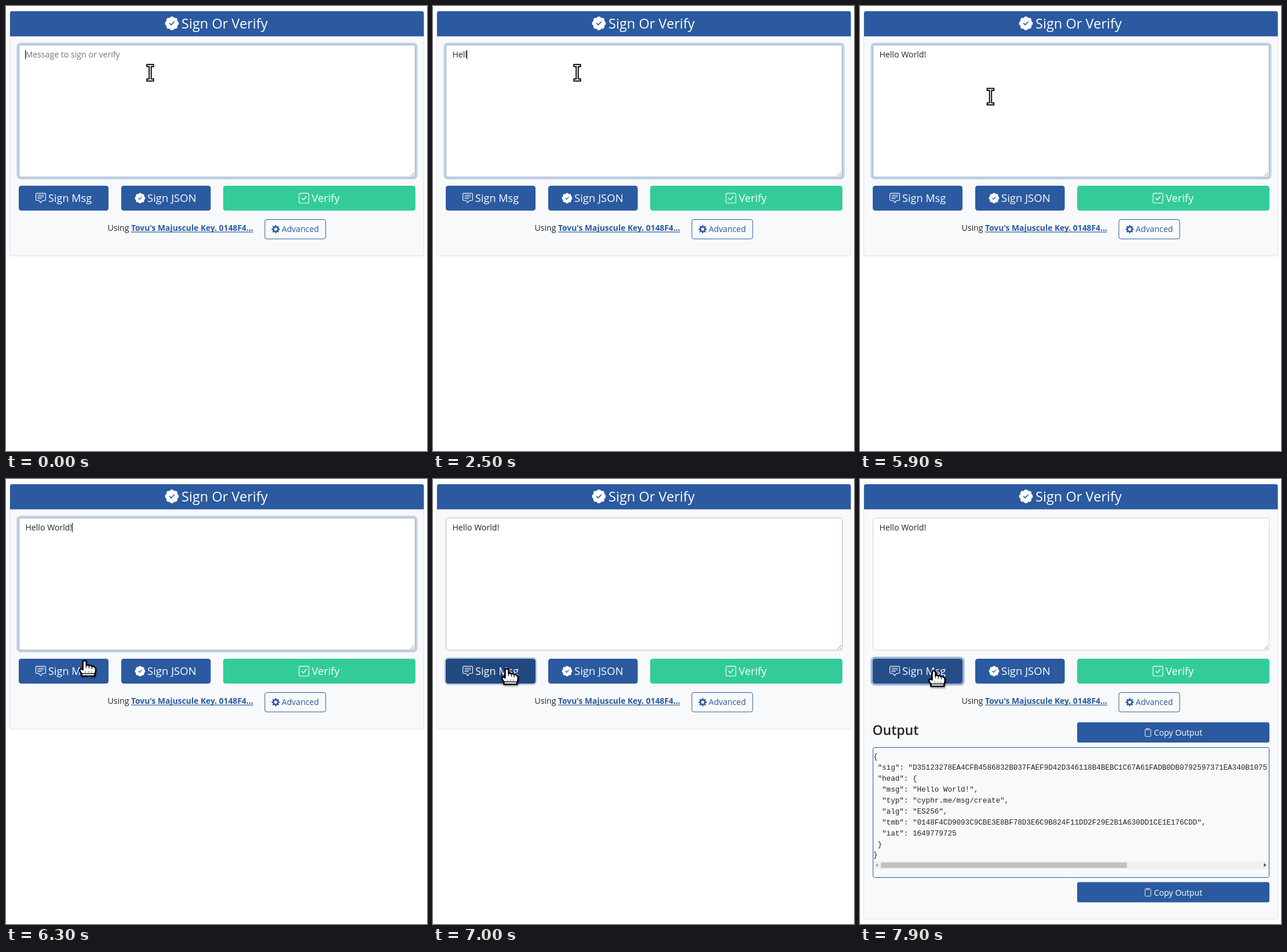
An HTML page with a canvas for the animation above (8 s loop, 727 by 770 pixels).

```html
<!DOCTYPE html>
<html lang="en">
<head>
<meta charset="utf-8">
<title>Sign Or Verify</title>
<style>
  html, body { margin: 0; width: 100%; height: 100%; overflow: hidden; background: #fff; }
  canvas { display: block; width: 727px; height: 770px; }
</style>
</head>
<body>
<canvas id="stage"></canvas>
<script>
const W = 727, H = 770, LOOP = 8000;
const BLUE = '#2b5aa0', GREEN = '#33cc99', INK = '#212529', PANEL = '#f8f9fa';
const SANS = '"Open Sans", sans-serif', MONO = '"Liberation Mono", monospace';
const canvas = document.getElementById('stage');
const ctx = canvas.getContext('2d');
const dpr = window.devicePixelRatio || 1;
canvas.width = W * dpr;
canvas.height = H * dpr;

const MESSAGE = 'Hello World!';
const KEY_TIMES = [1700, 1900, 2300, 2500, 2700, 2900, 3200, 3400, 3600, 4100, 4300, 4900];
const CARET_OFF = [[1100, 1700], [5500, 6100], [6700, 7000]];
const OUTPUT = [
  '{',
  ' "sig": "D35123278EA4CFB4586832B037FAEF9D42D346118B4BEBC1C67A61FADB0DB0792597371EA340B1075',
  ' "head": {',
  '  "msg": "Hello World!",',
  '  "typ": "cyphr.me/msg/create",',
  '  "alg": "ES256",',
  '  "tmb": "0148F4CD9093C9CBE3E8BF78D3E6C9B824F11DD2F29E2B1A630DD1CE1E176CDD",',
  '  "iat": 1649779725',
  ' }',
  '}'
];

const mix = (a, b, p) => 'rgb(' + a.map((v, i) => Math.round(v + (b[i] - v) * p)) + ')';

function box(x, y, w, h, r, fill, stroke) {
  ctx.beginPath();
  ctx.roundRect(x, y, w, h, r);
  if (fill) { ctx.fillStyle = fill; ctx.fill(); }
  if (stroke) { ctx.strokeStyle = stroke; ctx.lineWidth = 1; ctx.stroke(); }
}

function text(str, x, y, size, color, weight = 400, family = SANS) {
  ctx.font = `${weight} ${size}px ${family}`;
  ctx.fillStyle = color;
  ctx.fillText(str, x, y);
  return ctx.measureText(str).width;
}

function line(points, color, width) {
  ctx.beginPath();
  points.forEach(([x, y]) => ctx.lineTo(x, y));
  ctx.strokeStyle = color;
  ctx.lineWidth = width;
  ctx.stroke();
}

// Runs a drawing in units of a 16 x 16 icon grid.
function icon(x, y, size, draw) {
  ctx.save();
  ctx.translate(x, y);
  ctx.scale(size / 16, size / 16);
  ctx.lineCap = ctx.lineJoin = 'round';
  draw();
  ctx.restore();
}

function disc(x, y, r, color) {
  ctx.beginPath();
  ctx.arc(x, y, r, 0, 7);
  ctx.fillStyle = color;
  ctx.fill();
}

function badge() {
  disc(8, 8, 6.4, '#fff');
  for (let i = 0; i < 8; i++) {
    const a = i * Math.PI / 4;
    disc(8 + 5.3 * Math.cos(a), 8 + 5.3 * Math.sin(a), 2.6, '#fff');
  }
  line([[5.5, 8.1], [7.2, 9.8], [10.5, 6.3]], BLUE, 1.1);
}

function chat() {
  ctx.beginPath();
  ctx.moveTo(2, .5);
  ctx.lineTo(14, .5);
  ctx.quadraticCurveTo(15.5, .5, 15.5, 2);
  ctx.lineTo(15.5, 10);
  ctx.quadraticCurveTo(15.5, 11.5, 14, 11.5);
  ctx.lineTo(11.5, 11.5);
  ctx.quadraticCurveTo(10.4, 11.5, 9.8, 12.5);
  ctx.lineTo(8, 15);
  ctx.lineTo(6.2, 12.5);
  ctx.quadraticCurveTo(5.6, 11.5, 4.5, 11.5);
  ctx.lineTo(2, 11.5);
  ctx.quadraticCurveTo(.5, 11.5, .5, 10);
  ctx.lineTo(.5, 2);
  ctx.quadraticCurveTo(.5, .5, 2, .5);
  ctx.strokeStyle = '#fff';
  ctx.lineWidth = 1;
  ctx.stroke();
  [[3.5, 12.5], [6, 12.5], [8.5, 9]].forEach(([y, end], i) =>
    line([[3.5, 3.5 + i * 2.5], [end, y - (i ? 0 : 0)]], '#fff', 1));
}

function checkbox() {
  box(.5, .5, 15, 15, 1.5, null, '#fff');
  line([[4.6, 8], [7.2, 10.6], [11.4, 5.3]], '#fff', 1.3);
}

function gear() {
  ctx.beginPath();
  for (let i = 0; i < 8; i++) {
    [[-.25, 5.9], [-.14, 8], [.14, 8], [.25, 5.9]].forEach(([d, r]) => {
      const a = i * Math.PI / 4 + d;
      ctx.lineTo(8 + r * Math.cos(a), 8 + r * Math.sin(a));
    });
  }
  ctx.closePath();
  ctx.moveTo(10.9, 8);
  ctx.arc(8, 8, 2.9, 0, 2 * Math.PI, true);
  ctx.fillStyle = BLUE;
  ctx.fill('evenodd');
}

function clipboard() {
  box(2.5, 1.5, 11, 14, 1.5, null, '#fff');
  box(5.5, .5, 5, 2.2, .6, BLUE, '#fff');
}

function ring(x, y, w, h, r, spread, color) {
  if (spread > 0) box(x - spread, y - spread, w + 2 * spread, h + 2 * spread, r + spread, color);
}

function messageField(t, focus) {
  ring(22, 67, 685, 229.5, 3.6, 3.6 * focus, `rgba(43,90,160,${.25 * focus})`);
  box(22.5, 67.5, 684, 228.5, 3.2, '#fff', mix([206, 212, 218], [149, 173, 208], focus));
  line([[698.5, 294.5], [705, 288]], '#777', .9);
  line([[702.5, 294.5], [705, 292]], '#777', .9);

  const typed = MESSAGE.slice(0, KEY_TIMES.filter(k => t >= k).length);
  let width = 0;
  if (typed) width = text(typed, 33.4, 89, 14.15, INK);
  else text('Message to sign or verify', 33.4, 89, 14.15, '#6c757d');
  if (t < 7000 && !CARET_OFF.some(([a, b]) => t >= a && t < b)) {
    ctx.fillStyle = '#000';
    ctx.fillRect(Math.floor(33.4 + width), 76, 1, 16);
  }
}

function signButton(t, focus) {
  const base = [43, 90, 160], hover = [37, 77, 136], active = [34, 72, 128];
  let fill = mix(base, hover, 0);
  if (t >= 7200) fill = mix(hover, hover, 0);
  else if (t >= 7000) fill = mix(active, active, 0);
  else if (t >= 6400) fill = mix(base, hover, t >= 6500 ? 1 : .7);
  const blur = 1 - focus;
  ring(22, 311, 155, 43, 4.3, 3.6 * blur, `rgba(75,115,174,${.5 * blur})`);
  box(22, 311, 155, 43, 4.3, fill);
  icon(51, 323.5, 18, chat);
  text('Sign Msg', 73, 339, 18.1, '#fff');
}

function copyButton(y) {
  box(375, y, 332, 35, 3.6, BLUE);
  icon(490, y + 10.5, 14.4, clipboard);
  text('Copy Output', 507.5, y + 23, 14.15, '#fff');
}

function arrow(x, y, dir, color) {
  ctx.beginPath();
  ctx.moveTo(x + 2 * dir, y);
  ctx.lineTo(x - 2 * dir, y - 3.5);
  ctx.lineTo(x - 2 * dir, y + 3.5);
  ctx.fillStyle = color;
  ctx.fill();
}

function output() {
  text('Output', 21.5, 443, 23, INK, 600);
  copyButton(421);
  box(22.5, 464.5, 684, 225, 3.2, PANEL, BLUE);
  ctx.save();
  ctx.beginPath();
  ctx.rect(23, 465, 683, 224);
  ctx.clip();
  OUTPUT.forEach((row, i) => text(row, 22.9, 484.3 + i * 18.9, 12.6, INK, 400, MONO));
  ctx.fillStyle = '#f1f1f1';
  ctx.fillRect(23, 661, 683, 14);
  ctx.fillStyle = '#c1c1c1';
  ctx.fillRect(36, 663.5, 425, 9.5);
  arrow(29, 668, -1, '#a3a3a3');
  arrow(699.5, 668, 1, '#505050');
  ctx.restore();
  copyButton(697.5);
}

function beam(x, y) {
  ctx.save();
  ctx.translate(x, y);
  ctx.lineJoin = 'miter';
  ctx.lineCap = 'square';
  for (const [color, width] of [['#000', 5.4], ['#fff', 1.7]]) {
    line([[-4, -12.5], [4, -12.5]], color, width);
    line([[-4, 12.5], [4, 12.5]], color, width);
    line([[0, -12], [0, 12]], color, width);
  }
  ctx.restore();
}

// The tip of the index finger is at x, y.
function hand(x, y) {
  ctx.save();
  ctx.translate(x, y);
  const shape = new Path2D(
    'M-2.8 2.5 Q-2.8 0 0 0 Q2.8 0 2.8 2.5 L2.8 8.5 Q5 7 7.8 9 Q10.5 8 12.8 10.3 ' +
    'Q15 9.5 17.2 11.8 Q19 12 19 14.5 L19 18 Q18.5 21 17.5 23 L17.5 26.5 L-4.8 26.5 ' +
    'L-4.8 22.5 Q-8 19 -8 16.5 Q-8 14 -5.5 14.5 L-2.8 16 Z');
  ctx.lineJoin = 'round';
  ctx.save();
  ctx.shadowColor = 'rgba(0,0,0,.4)';
  ctx.shadowBlur = 3 * dpr;
  ctx.shadowOffsetX = dpr;
  ctx.shadowOffsetY = 2 * dpr;
  ctx.strokeStyle = '#000';
  ctx.lineWidth = 3;
  ctx.stroke(shape);
  ctx.restore();
  ctx.fillStyle = '#fff';
  ctx.fill(shape);
  ctx.strokeStyle = '#000';
  ctx.lineWidth = 2;
  ctx.stroke(shape);
  for (const [kx, ky] of [[2.8, 8.5], [7.8, 9.5], [12.8, 10.8]]) {
    line([[kx, ky], [kx, ky + 4]], '#000', 1.2);
  }
  ctx.fillStyle = '#777';
  for (let i = 0; i < 3; i++) ctx.fillRect(1 + i * 5, 18.5, 1.3, 2.5);
  line([[-4.8, 22.5], [17.5, 22.5]], '#000', 1.4);
  ctx.restore();
}

function pointer(t) {
  const step = Math.floor((t - 5800) / 100);
  const u = Math.min(1, Math.max(0, step / 7));
  const p = 1 - Math.pow(1 - Math.pow(u, 1.3), 2.6);
  const x = 249 - 121.5 * p;
  const y = 115.5 + 213 * p + (t >= 7900 ? 3.5 : 0);
  if (y < 300) beam(x, y);
  else hand(x, y);
}

function draw(t) {
  const done = t >= 7100;
  const focus = t < 7000 ? 1 : t < 7100 ? .32 : t < 7200 ? .02 : 0;
  ctx.setTransform(dpr, 0, 0, dpr, 0, 0);
  ctx.fillStyle = '#fff';
  ctx.fillRect(0, 0, W, H);

  box(6.5, 9.5, 715, done ? 752 : 423, 3.6, PANEL, '#dfe0e1');
  box(7, 9, 714.5, 43.5, [3.6, 3.6, 0, 0], BLUE);
  icon(274.5, 18, 24, badge);
  text('Sign Or Verify', 303, 38.5, 23.6, '#fff', 500);

  messageField(t, focus);
  signButton(t, focus);
  box(199, 311, 154.5, 43, 4.3, BLUE);
  icon(222.5, 323.5, 18, badge);
  text('Sign JSON', 244, 339, 18.5, '#fff');
  box(375, 311, 332, 43, 4.3, GREEN);
  icon(505.5, 323.5, 18, checkbox);
  text('Verify', 528, 339, 18.3, '#fff');

  text('Using', 175.5, 389, 14.15, INK);
  const link = text("Tovu's Majuscule Key. 0148F4...", 216, 389, 13.85, BLUE, 700);
  ctx.fillRect(216, 390.5, link, 1.2);
  box(447, 369.5, 105, 33.5, 3.4, null, BLUE);
  icon(458.5, 379, 14.4, gear);
  text('Advanced', 476, 391, 14.1, BLUE);

  if (done) output();
  pointer(t);
}

const start = performance.now();
function tick() {
  draw((performance.now() - start) % LOOP);
  requestAnimationFrame(tick);
}
tick();
</script>
</body>
</html>
```
